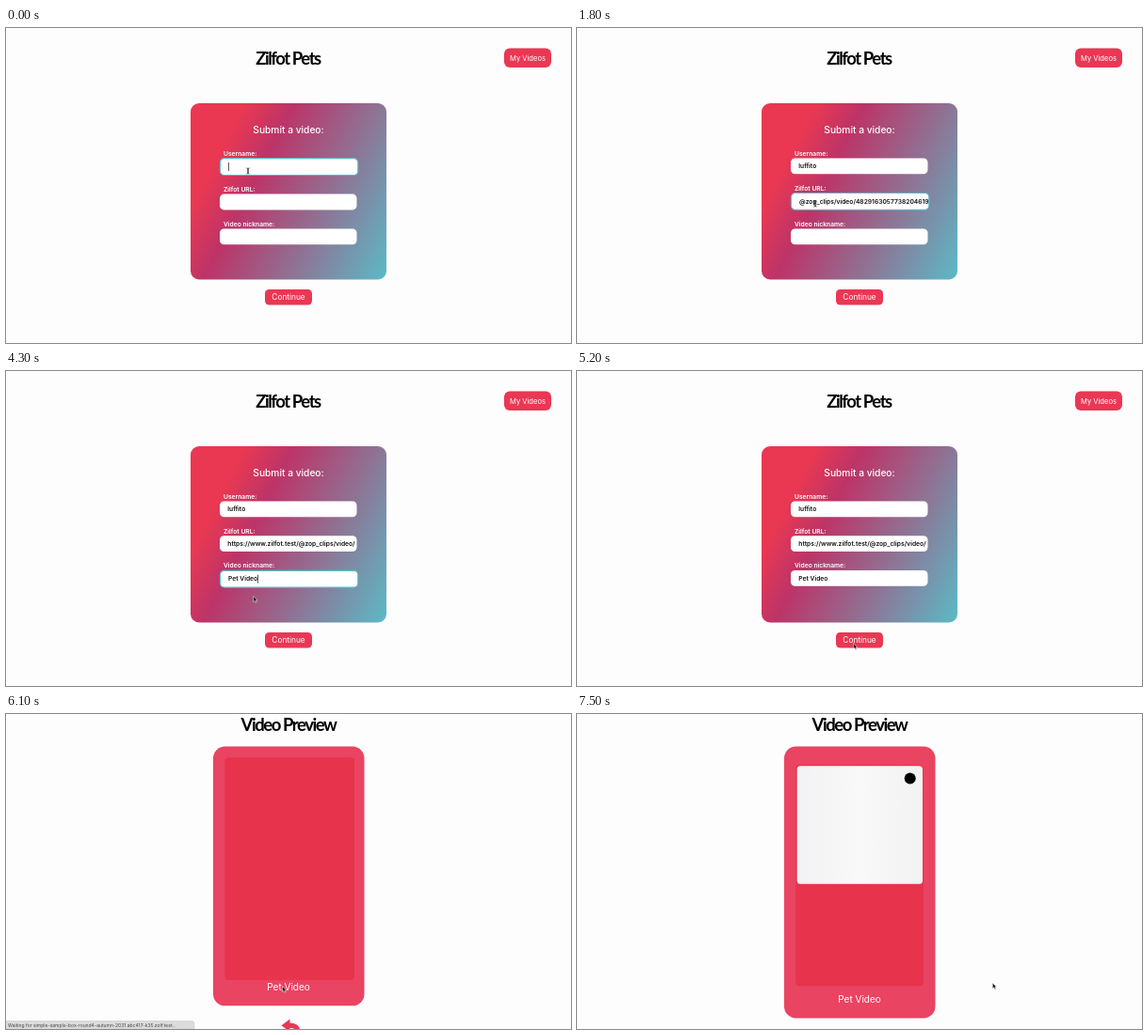
Animation of 600 by 335 pixels, one loop 8 s. Source, as an HTML page:

```html
<!DOCTYPE html>
<html lang="en">
<head>
<meta charset="utf-8">
<title>Submit a video</title>
<style>
  html, body { margin: 0; width: 100%; height: 100%; overflow: hidden; background: #fefdfe; }
  svg { display: block; width: 100vw; height: 100vh; }
  text { font-family: Inter, "Liberation Sans", sans-serif; white-space: pre; }
  .title { font: 700 18.5px Lato, "Open Sans", sans-serif; letter-spacing: -1.45px; text-anchor: middle; }
  .mid { text-anchor: middle; fill: #fff; }
  .label { font-size: 6.7px; font-weight: 600; fill: #fff; }
  .value { font-size: 6.7px; font-weight: 600; fill: #111; }
  .red { fill: #e93754; }
  .card { fill: #e94462; }
</style>
</head>
<body>
<svg viewBox="0 0 600 335">
  <defs>
    <linearGradient id="panelFill" gradientUnits="userSpaceOnUse" x1="179.7" y1="112.2" x2="420.3" y2="234.8">
      <stop offset=".19" stop-color="#ea3852"/>
      <stop offset=".36" stop-color="#bc3468"/>
      <stop offset="1" stop-color="#5bbac6"/>
    </linearGradient>
    <linearGradient id="shimmer" gradientUnits="userSpaceOnUse" x1="234" x2="367" y1="0" y2="0">
      <stop offset="0" stop-color="#f2f1f3"/>
      <stop offset=".5" stop-color="#f9f9f9"/>
      <stop offset="1" stop-color="#f2f2f3"/>
    </linearGradient>
    <clipPath id="fieldClip"><rect x="228" y="130" width="145.2" height="110"/></clipPath>
  </defs>

  <g id="formPage">
    <text class="title" x="299.5" y="38.5">Zilfot Pets</text>
    <rect class="red" x="529" y="21.5" width="50" height="20.5" rx="6"/>
    <text class="mid" x="554" y="34.6" font-size="7.6">My Videos</text>
    <rect x="196" y="80" width="208" height="187.5" rx="9" fill="url(#panelFill)"/>
    <text class="mid" x="300" y="111.5" font-size="10.2" font-weight="500">Submit a video:</text>
    <g id="fields"></g>
    <rect class="red" x="275" y="278" width="50" height="16.5" rx="4.5"/>
    <text class="mid" x="300" y="289.3" font-size="8.3">Continue</text>
  </g>

  <g id="previewPage">
    <text id="heading" class="title" x="300">Video Preview</text>
    <rect id="card" class="card" x="220" width="160.5" rx="12.5"/>
    <g id="smallPage">
      <rect class="red" x="523" y="188" width="56" height="18.7" rx="4"/>
      <text class="mid" x="551" y="200.3" font-size="7.5">Continue</text>
    </g>
    <g id="openCard">
      <rect id="inner" x="232.3" rx="4" fill="#e7344c"/>
      <g id="player">
        <rect x="233.7" y="55.3" width="133.3" height="125.5" rx="3.5" fill="url(#shimmer)"/>
        <circle cx="353.7" cy="68.5" r="6"/>
      </g>
      <text id="caption" class="mid" x="300" font-size="10">Pet Video</text>
      <path id="back" class="red" d="M292.5 331.2L301.5 324.6V328.4C308 328.6 312.5 331.5 312.2 338H308C308 335 305 334 301.5 334V338Z"/>
    </g>
  </g>

  <g id="status">
    <path d="M0 326.5H197Q200 326.5 200 329.5V335H0Z" fill="#dcdbdd" stroke="#c4c3c5" stroke-width=".5"/>
    <text x="2" y="332.8" font-size="5" fill="#444">Waiting for simple-sample-box-round4-autumn-2031.abc417-k35.zolf.test...</text>
  </g>

  <path id="beam" d="M-1.6 -3Q0 -3 0 -2V2Q0 3 -1.6 3M1.6 -3Q0 -3 0 -2V2Q0 3 1.6 3" fill="none" stroke="#222" stroke-width=".8"/>
  <path id="arrow" d="M0 0V6L1.4 4.8L2.4 7L3.4 6.5L2.5 4.4H4.3Z" fill="#111" stroke="#fff" stroke-width=".5"/>
</svg>
<script>
const LOOP = 8000, STEP = 100;
const NS = "http://www.w3.org/2000/svg";
const $ = id => document.getElementById(id);
const set = (node, attrs) => {
  for (const key in attrs) node.setAttribute(key, attrs[key]);
  return node;
};
const add = (parent, tag, attrs) => set(parent.appendChild(document.createElementNS(NS, tag)), attrs);
const show = (node, on) => { node.style.display = on ? "" : "none"; };
const typed = (text, t, start, gap) =>
  text.slice(0, Math.max(0, Math.floor((t - start) / gap) + 1));

const URL_HEAD = "https://www.zilfot.test/@zop_clips/video/";
const URL_TAIL = "@zop_clips/video/4829163057738204619";

const fields = ["Username:", "Zilfot URL:", "Video nickname:"].map(name => {
  const parent = $("fields");
  const label = add(parent, "text", { class: "label", x: 231 });
  label.textContent = name;
  return {
    label,
    box: add(parent, "rect", { rx: 4.5, fill: "#fff" }),
    value: add(parent, "text", { class: "value", "clip-path": "url(#fieldClip)" }),
    caret: add(parent, "rect", { width: 0.8, height: 9, fill: "#333" })
  };
});

// Pointer stops: time, x, y
const pointerPath = [
  [0, 257, 152], [1000, 257, 152], [1400, 253, 187], [1900, 253, 187],
  [2400, 252, 222], [4100, 252, 222], [4700, 293.5, 289.5],
  [6900, 293.5, 289.5], [7400, 441.3, 286]
];

function pointerAt(t) {
  const next = pointerPath.findIndex(stop => stop[0] > t);
  if (next < 0) return pointerPath[pointerPath.length - 1].slice(1);
  const [t0, x0, y0] = pointerPath[next - 1], [t1, x1, y1] = pointerPath[next];
  const p = (t - t0) / (t1 - t0), ease = p * p * (3 - 2 * p);
  return [x0 + (x1 - x0) * ease, y0 + (y1 - y0) * ease];
}

function drawForm(t) {
  const focus = t < 1400 ? 0 : t < 2400 ? 1 : t < 5000 ? 2 : -1;
  const values = [
    typed("luffito", t, 200, 100),
    t < 1600 ? "" : focus === 1 ? URL_TAIL : URL_HEAD,
    typed("Pet Video", t, 2900, 120)
  ];
  fields.forEach(({ label, box, value, caret }, i) => {
    const focused = focus === i;
    const shift = focus >= 0 && focus < i ? 1.4 : 0;
    const y = 138.4 + 36.8 * i + shift;
    const x = focused ? 236 : 235.3;
    set(label, { y: y - 2.7 });
    set(box, focused
      ? { x: 227.4, y: y + 0.3, width: 146.4, height: 17.8, stroke: "#5bbac6", "stroke-width": 1.2 }
      : { x: 227, y, width: 145.5, height: 16.8, stroke: "none" });
    set(value, { x, y: y + (focused ? 11.3 : 10.7) });
    if (value.textContent !== values[i]) value.textContent = values[i];
    show(caret, focused && values[i] !== URL_TAIL);
    if (focused) set(caret, { x: x + (values[i] ? value.getComputedTextLength() : 0), y: y + 4.6 });
  });
}

function drawPreview(t) {
  const open = t >= 5900, grown = t >= 6600;
  set($("heading"), { y: open ? 17.5 : 125.5 });
  set($("card"), { y: open ? 34.5 : 142, height: grown ? 289 : open ? 275.8 : 25 });
  set($("inner"), grown
    ? { y: 54, width: 135.7, height: 235.3 }
    : { y: 46.3, width: 137.7, height: 236.7 });
  set($("caption"), { y: grown ? 307 : 293.7 });
  show($("smallPage"), !open);
  show($("openCard"), open);
  show($("player"), grown);
  show($("back"), !grown);
  const slide = (t - 7500) * 0.06;
  set($("shimmer"), { gradientTransform: `translate(${slide} 0)` });
}

function draw(t) {
  const onForm = t < 5500;
  show($("formPage"), onForm);
  show($("previewPage"), !onForm);
  if (onForm) drawForm(t); else drawPreview(t);
  show($("status"), t >= 5300 && t < 6500);

  const at = `translate(${pointerAt(t).join(" ")})`;
  const hidden = (t >= 200 && t < 1000) || (t >= 2900 && t < 4100);
  const overField = t < 4300;
  set($("beam"), { transform: at });
  set($("arrow"), { transform: at });
  show($("beam"), overField && !hidden);
  show($("arrow"), !overField);
}

const begin = performance.now();
function tick() {
  const t = (performance.now() - begin) % LOOP;
  draw(Math.min(7500, Math.floor(t / STEP) * STEP));
  requestAnimationFrame(tick);
}
tick();
</script>
</body>
</html>
```
